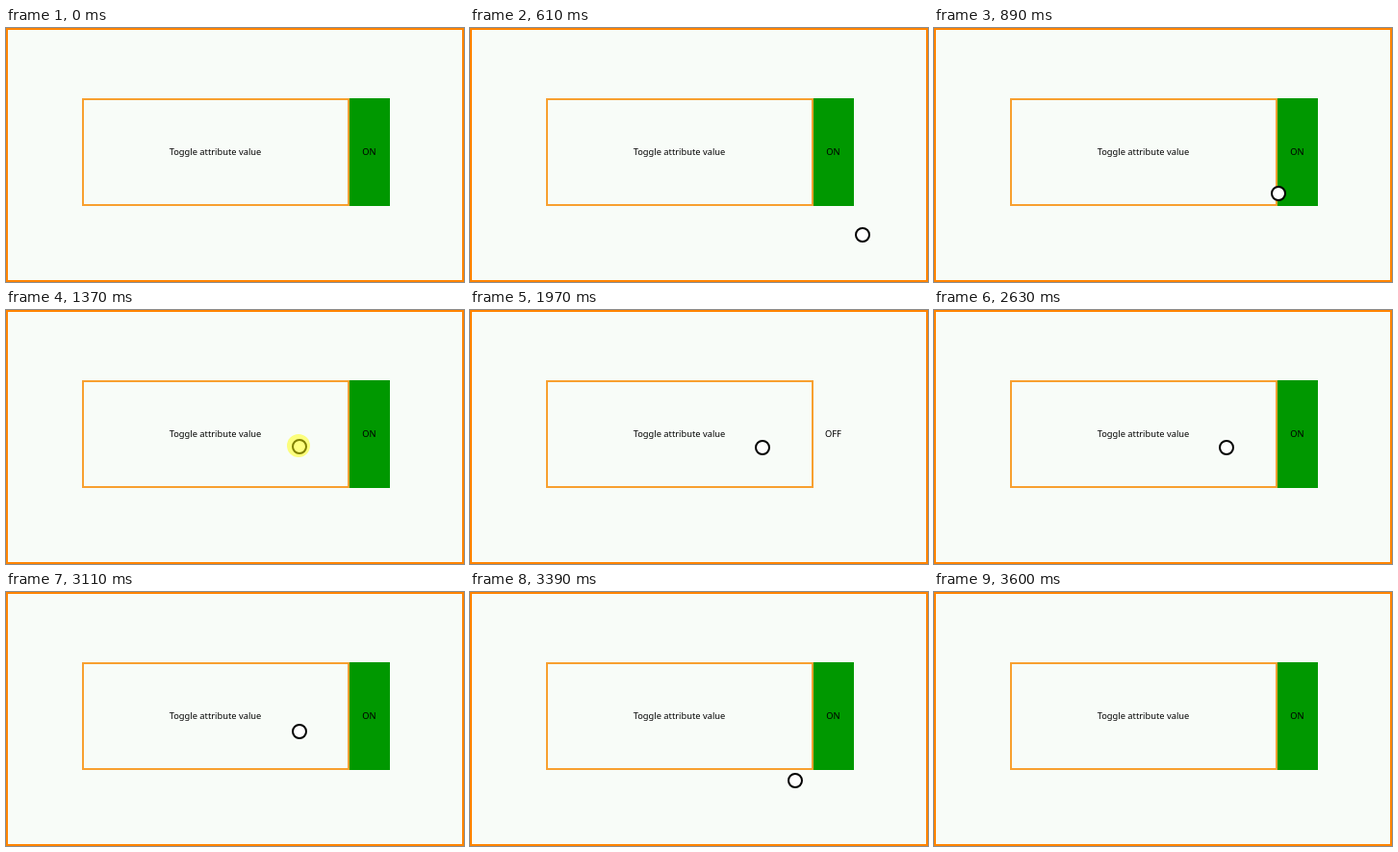
These frames come from a looping animation (476x264 px, 4200 ms). An HTML page:

```html
<!DOCTYPE html>
<html lang="en">
<head>
<meta charset="utf-8">
<title>Toggle</title>
<style>
  html, body { margin: 0; width: 100%; height: 100%; overflow: hidden; background: #f8fcf8; }
  svg { display: block; width: 476px; height: 264px; }
  text { font: 9.3px "Noto Sans", "Open Sans", sans-serif; text-anchor: middle; fill: #000; }
</style>
</head>
<body>
<svg viewBox="0 0 476 264">
  <rect width="476" height="264" fill="#f8fcf8"/>
  <rect x="1" y="1" width="474" height="262" fill="none" stroke="#ff8400" stroke-width="2"/>
  <rect x="80" y="74" width="276" height="110" fill="none" stroke="#f8a030" stroke-width="2"/>
  <rect id="lamp" x="357" y="73" width="42" height="112" fill="#009800"/>
  <text x="217.5" y="132">Toggle attribute value</text>
  <text id="label" x="377.5" y="132">ON</text>
  <g id="cursor">
    <circle r="7" fill="#fff" stroke="#000" stroke-width="2"/>
    <circle id="halo" cx="-1" cy="-1" r="12" fill="#ff0" opacity=".5"/>
  </g>
</svg>
<script>
const LOOP = 4200, TICK = 70;
const ENTER = 400, ARRIVE = 1100, NUDGE = 1970, LEAVE = 3040, GONE = 3600;
const CLICKS = [[1370, 1440], [2500, 2630]];

const $ = id => document.getElementById(id);
const [lamp, label, cursor, halo] = ['lamp', 'label', 'cursor', 'halo'].map($);
const show = (el, on) => el.setAttribute('visibility', on ? 'visible' : 'hidden');
const mix = (a, b, u) => Math.round(a + (b - a) * u);
// Progress from a to b, advancing in whole ticks
const progress = (t, a, b) => Math.floor((t - a) / TICK) * TICK / (b - a);

function position(t) {
  if (t < ARRIVE) {
    const u = progress(t, ENTER, ARRIVE);
    return [mix(425, 305, u ** 1.64), mix(254, 142, u ** 0.88)];
  }
  if (t < NUDGE) return [305, 142];
  if (t < LEAVE) return [304, 143];
  const u = progress(t, LEAVE, GONE - TICK);
  return [mix(304, 376, u ** 2.2), mix(143, 247, u ** 2)];
}

function draw(t) {
  const on = t < CLICKS[0][1] || t >= CLICKS[1][1];
  show(lamp, on);
  label.textContent = on ? 'ON' : 'OFF';

  const visible = t >= ENTER && t < GONE;
  show(cursor, visible);
  show(halo, CLICKS.some(([a, b]) => t >= a && t < b));
  if (visible) cursor.setAttribute('transform', `translate(${position(t)})`);
}

const start = performance.now();
function tick() {
  draw((performance.now() - start) % LOOP);
  requestAnimationFrame(tick);
}
tick();
</script>
</body>
</html>
```
